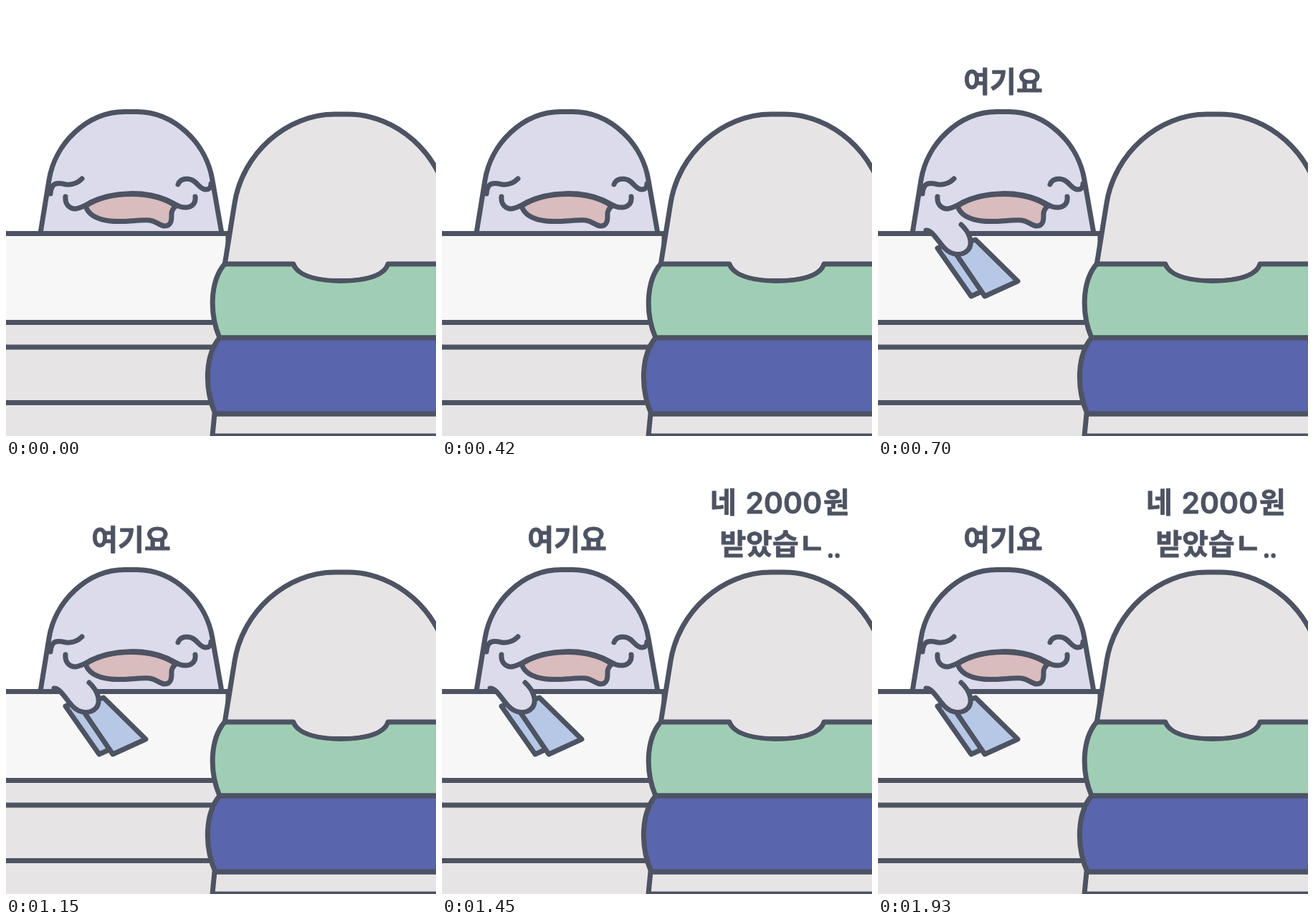
Recreate the animation shown at these times as an HTML page. Size 600 by 600 pixels, loop 2250 ms.

```html
<!DOCTYPE html>
<html lang="ko">
<meta charset="utf-8">
<style>
  html, body { margin: 0; width: 100%; height: 100%; overflow: hidden; background: #fff; }
  svg { display: block; width: 100%; height: 100%; }
  .art { stroke: #4d5362; stroke-width: 7; stroke-linecap: round; stroke-linejoin: round; fill: none; }
  .lilac { fill: #dcdbec; }
  .gray { fill: #e6e4e5; }
  .bill { fill: #b7c8e6; }
  text { font: 700 40px "Noto Sans CJK KR", "Noto Sans CJK", "Noto Sans CJK JP", sans-serif;
    fill: #4d5362; stroke: #4d5362; stroke-width: .8; stroke-linejoin: round; }
  .digits { font: 600 41px Inter, sans-serif; }
  .dots { font-size: 30px; }
</style>
<svg viewBox="0 0 600 600">
  <g class="art">
    <!-- customer -->
    <path class="lilac" d="M47.500 320L60 243C68 192 113 147.500 166 147.500H182C235 147.500 280 192 288 243L301.500 320"/>
    <path d="M62 262C63 244 74 247 84 249C95 250 101 246 106 241M240 249C243 240 254 240 260 243C268 247 270 255 278 256C284 256 286 253 286 248"/>
    <path fill="#d9bcbe" d="M111 279C115 292 128 298 145 300C165 302 185 298 200 299C210 300 213 306 221 307C232 307 231 296 231 290C231 284 234 282 237 279C205 257 145 257 111 279Z"/>
    <path d="M83 266C82 276 88 283 97 283C105 282 111 278 118 274C150 258 196 258 225 271C236 276 242 282 252 281C262 280 265 273 264 266"/>

    <!-- counter -->
    <path fill="#f7f7f7" d="M-9 317.500H310V441.500H-9Z"/>
    <path class="gray" d="M-9 441.500H300V476H-9ZM-9 476H300V553.500H-9ZM-9 553.500H300V609H-9Z"/>

    <!-- cashier -->
    <path class="gray" d="M305 362L319 275C330 206 391 151 459 151H477C545 151 606 206 617 275V362"/>
    <path class="gray" d="M291 569L288 600H610V569Z"/>
    <path fill="#a0ceb5" d="M305 360H401C408 378 440 383.500 467 383.500C497 383.500 527 378 533 360H610V463H298C284 430 284 385 305 360Z"/>
    <path class="gray" stroke="none" d="M405 356H529V360C521 376 495 380 467 380C440 380 412 376 405 360Z"/>
    <path fill="#5965ac" d="M298 463H610V569H292C277 535 277 488 298 463Z"/>
  </g>

  <g id="payment">
    <g class="art">
      <path class="bill" d="M83 338L130 405L152 395L107 327Z"/>
      <path class="bill" d="M100 333L149 405L195 384L136 326L118 332Z"/>
      <path class="lilac" d="M67 313C75 312 82 326 92 337C103 349 118 349 126 340C133 331 128 316 116 305"/>
    </g>
    <text x="174.500" y="120" text-anchor="middle">여기요</text>
  </g>

  <g id="reply">
    <text x="374" y="68">네</text>
    <text class="digits" x="423.500" y="69">2000</text>
    <text x="532" y="68">원</text>
    <text x="387.500" y="126">받았습ㄴ</text>
    <text class="dots" x="537" y="130">..</text>
  </g>
</svg>
<script>
  const LOOP = 2250;
  const cues = { payment: 700, reply: 1450 };

  function draw() {
    const time = performance.now() % LOOP;
    for (const id in cues) {
      document.getElementById(id).style.visibility = time < cues[id] ? "hidden" : "visible";
    }
    requestAnimationFrame(draw);
  }
  draw();
</script>
</html>
```
